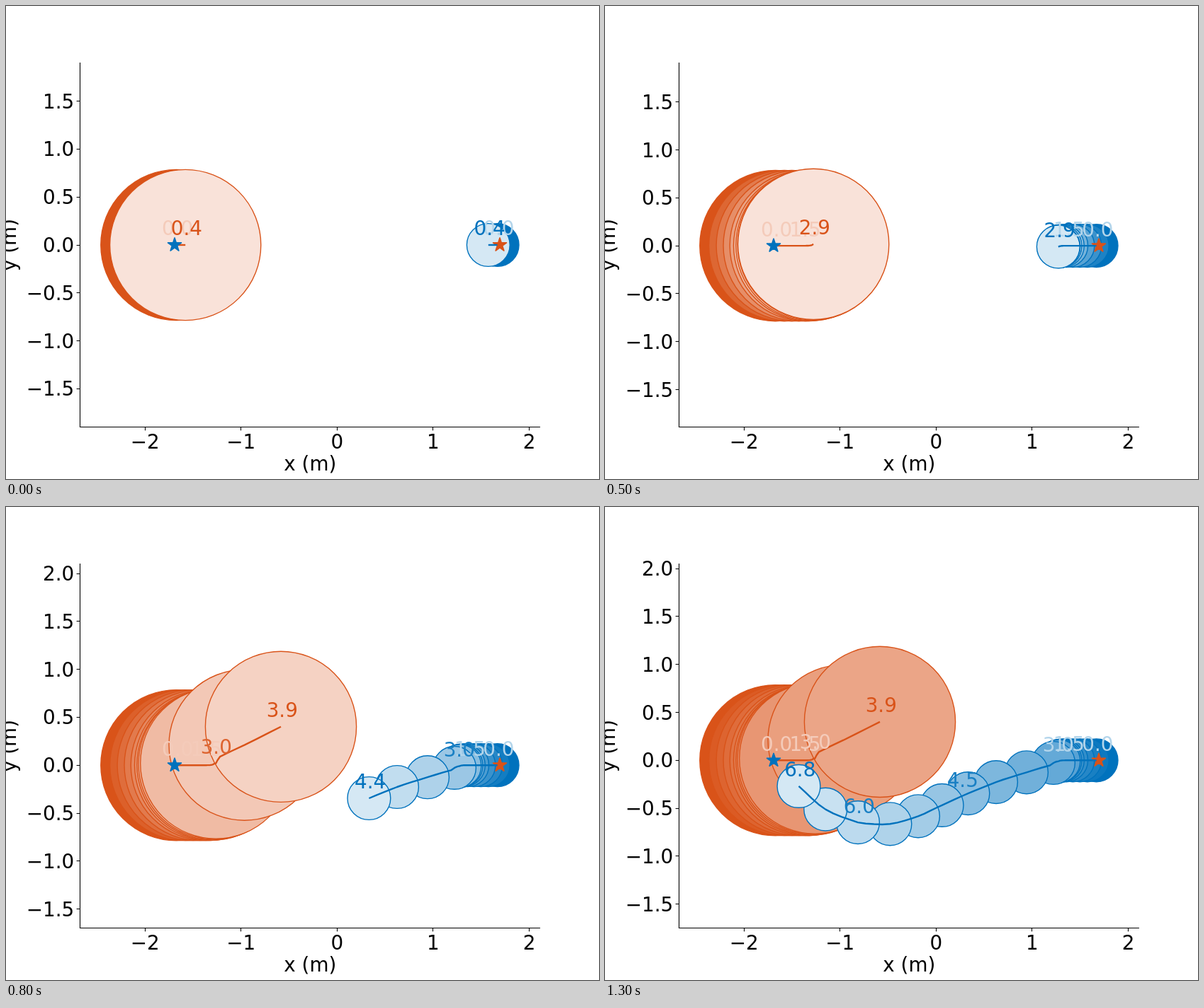
Write an HTML page with a canvas that moves like this. It is 837 px wide and 669 px high and loops after 2.3 s.

```html
<!DOCTYPE html>
<html lang="en">
<head>
<meta charset="utf-8">
<title>Two agents passing</title>
<style>
  html, body { margin: 0; width: 100%; height: 100%; overflow: hidden; background: #fff; }
  canvas { display: block; }
</style>
</head>
<body>
<canvas id="c" width="837" height="669"></canvas>
<script>
const ctx = document.getElementById('c').getContext('2d');
const FONT = '27.78px "DejaVu Sans", Verdana, sans-serif';
const UNIT = 135.6;                 // pixels per metre
const X0 = 467.3, MID = 338;        // x origin, middle of the axes
const LEFT = 104.5, RIGHT = 754, TOP = 80, BOTTOM = 595.5;
const STEP = 100, LAST = 13, LOOP = 2300;
const FADE = 1.2;

// Approach shared by both agents: time, pixels travelled, sideways drift
const approach = [
  [0, 0, 0], [0.4, 12.8, 0], [0.8, 23.3, 0], [1.2, 33.2, 0], [1.4, 38.2, 0],
  [1.6, 42.4, 0], [2, 47.7, 0.2], [2.4, 51, 0.8], [2.8, 53.2, 1.9], [2.9, 53.8, 2.2]
];

// Path points: time, x in pixels, height above y = 0 in pixels
const agents = [
  {
    rgb: [217, 83, 25], r: 106.6, goal: 697, end: 3.9,
    path: approach.map(([t, d, s]) => [t, 240.4 + d, s]).concat([
      [3, 295, 2.3], [3.1, 295.6, 2.4], [3.2, 296.3, 2.7], [3.3, 298.5, 7],
      [3.4, 302, 12], [3.6, 336.6, 28.6], [3.9, 388, 54.4]
    ])
  },
  {
    rgb: [0, 114, 189], r: 30.4, goal: 238, end: 6.8,
    path: approach.map(([t, d, s]) => [t, 693.6 - d, -0.6 * s]).concat([
      [3, 638, -1.7], [3.1, 635.8, -2.4], [3.2, 633, -3.7], [3.3, 628, -7.2],
      [3.4, 617, -10.2], [3.6, 595, -17], [3.9, 562.3, -27.2], [4, 552, -30.8],
      [4.4, 512.4, -46.8], [4.8, 475.6, -63.6], [4.9, 466.6, -67.7],
      [5.2, 442, -79], [5.6, 402.4, -90], [5.9, 368, -89.5], [6, 357, -87.8],
      [6.4, 311.2, -69.3], [6.8, 273.5, -36.6]
    ])
  }
];

const clamp = (v, lo, hi) => Math.max(lo, Math.min(hi, v));

// Smooth position on a path at a given time
function at(path, t) {
  let i = 0;
  while (i < path.length - 2 && path[i + 1][0] < t) i++;
  const a = path[i], b = path[i + 1], h = b[0] - a[0];
  const u = clamp((t - a[0]) / h, 0, 1), v = 1 - u;
  const slope = (j, k) => {
    const p = path[Math.max(j - 1, 0)], q = path[Math.min(j + 1, path.length - 1)];
    return (q[k] - p[k]) / (q[0] - p[0]);
  };
  return [1, 2].map(k =>
    a[k] * v * v * (1 + 2 * u) + b[k] * u * u * (3 - 2 * u) +
    h * u * v * (v * slope(i, k) - u * slope(i + 1, k)));
}

// Multiples of gap below end
function times(end, gap) {
  const list = [];
  for (let n = 0; n * gap < end - 1e-6; n++) list.push(n * gap);
  return list;
}

const tint = (rgb, alpha) =>
  `rgb(${rgb.map(c => Math.round(255 + (c - 255) * alpha)).join(',')})`;

function line(points, color, width) {
  ctx.strokeStyle = color;
  ctx.lineWidth = width;
  ctx.beginPath();
  points.forEach(([x, y]) => ctx.lineTo(x, y));
  ctx.stroke();
}

function star(x, y, color) {
  ctx.beginPath();
  for (let i = 0; i < 10; i++) {
    const r = i % 2 ? 10.42 * 0.382 : 10.42, a = i * Math.PI / 5;
    ctx.lineTo(x + r * Math.sin(a), y - r * Math.cos(a));
  }
  ctx.closePath();
  ctx.fillStyle = ctx.strokeStyle = color;
  ctx.lineWidth = 1.39;
  ctx.lineJoin = 'bevel';
  ctx.fill();
  ctx.stroke();
  ctx.lineJoin = 'round';
}

function text(str, x, y, align, color = '#000') {
  ctx.font = FONT;
  ctx.textAlign = align;
  ctx.fillStyle = color;
  ctx.fillText(str, x, y);
}

const signed = (v, digits) => (v < 0 ? '\u2212' : '') + Math.abs(v).toFixed(digits);

function drawAxes(y0) {
  line([[LEFT, TOP], [LEFT, BOTTOM + 0.5]], '#000', 1.1);
  line([[LEFT - 0.5, BOTTOM], [RIGHT, BOTTOM]], '#000', 1.1);
  for (let v = -2; v <= 2; v++) {
    const x = X0 + v * UNIT, tx = Math.floor(x) + 0.5;
    line([[tx, BOTTOM], [tx, BOTTOM + 4.9]], '#000', 1.1);
    text(signed(v, 0), x, 626, 'center');
  }
  for (let v = -2.5; v <= 2.5; v += 0.5) {
    const y = y0 - v * UNIT;
    if (y < TOP || y > BOTTOM) continue;
    const ty = Math.floor(y) + 0.5;
    line([[LEFT - 4.9, ty], [LEFT, ty]], '#000', 1.1);
    text(signed(v, 1), 96.2, Math.round(y + 10), 'right');
  }
  text('x (m)', 429.3, 657, 'center');
  ctx.save();
  ctx.translate(14, MID);
  ctx.rotate(-Math.PI / 2);
  text('y (m)', 0, 0, 'center');
  ctx.restore();
}

function draw(step) {
  const now = Math.min(0.4 + 0.5 * step, 6.8);
  let hi = -1e3, lo = 1e3;
  const scene = agents.map(a => {
    const end = Math.min(now, a.end);
    const discs = [...times(end, 0.4), end].map(t => {
      const p = at(a.path, t);
      hi = Math.max(hi, p[1] + a.r);
      lo = Math.min(lo, p[1] - a.r);
      return { p, fill: tint(a.rgb, 1 - t / (FADE * now)) };
    });
    return { a, end, discs, color: tint(a.rgb, 1) };
  });
  const y0 = MID + (hi + lo) / 2;   // keeps the data centred

  ctx.fillStyle = '#fff';
  ctx.fillRect(0, 0, 837, 669);

  for (const { a, discs, color } of scene) {
    for (const { p, fill } of discs) {
      ctx.beginPath();
      ctx.arc(p[0], y0 - p[1], a.r, 0, 2 * Math.PI);
      ctx.fillStyle = fill;
      ctx.fill();
      ctx.strokeStyle = color;
      ctx.lineWidth = 1.39;
      ctx.stroke();
    }
  }

  ctx.lineJoin = 'round';
  for (const { a, end, color } of scene) {
    const track = [...times(end, 0.1), end].map(t => {
      const p = at(a.path, t);
      return [p[0], y0 - p[1]];
    });
    line(track, color, 2.4);
    star(a.goal, y0, color);
  }

  drawAxes(y0);

  for (const { a, end, color } of scene) {
    const label = (t, c) => {
      const p = at(a.path, t);
      text(t.toFixed(1), p[0] - 0.15 * UNIT, y0 - p[1] - 0.1 * UNIT, 'left', c);
    };
    for (const t of times(end, 1.5)) {
      label(t, tint(a.rgb, t / (FADE * now) < 0.5 ? 0.3 : 0.9));
    }
    label(end, color);
  }
}

const start = performance.now();
let shown = -1;
function tick() {
  const ms = (performance.now() - start) % LOOP;
  const step = Math.min(Math.floor(ms / STEP), LAST);
  if (step !== shown) draw(shown = step);
  requestAnimationFrame(tick);
}
tick();
</script>
</body>
</html>
```
